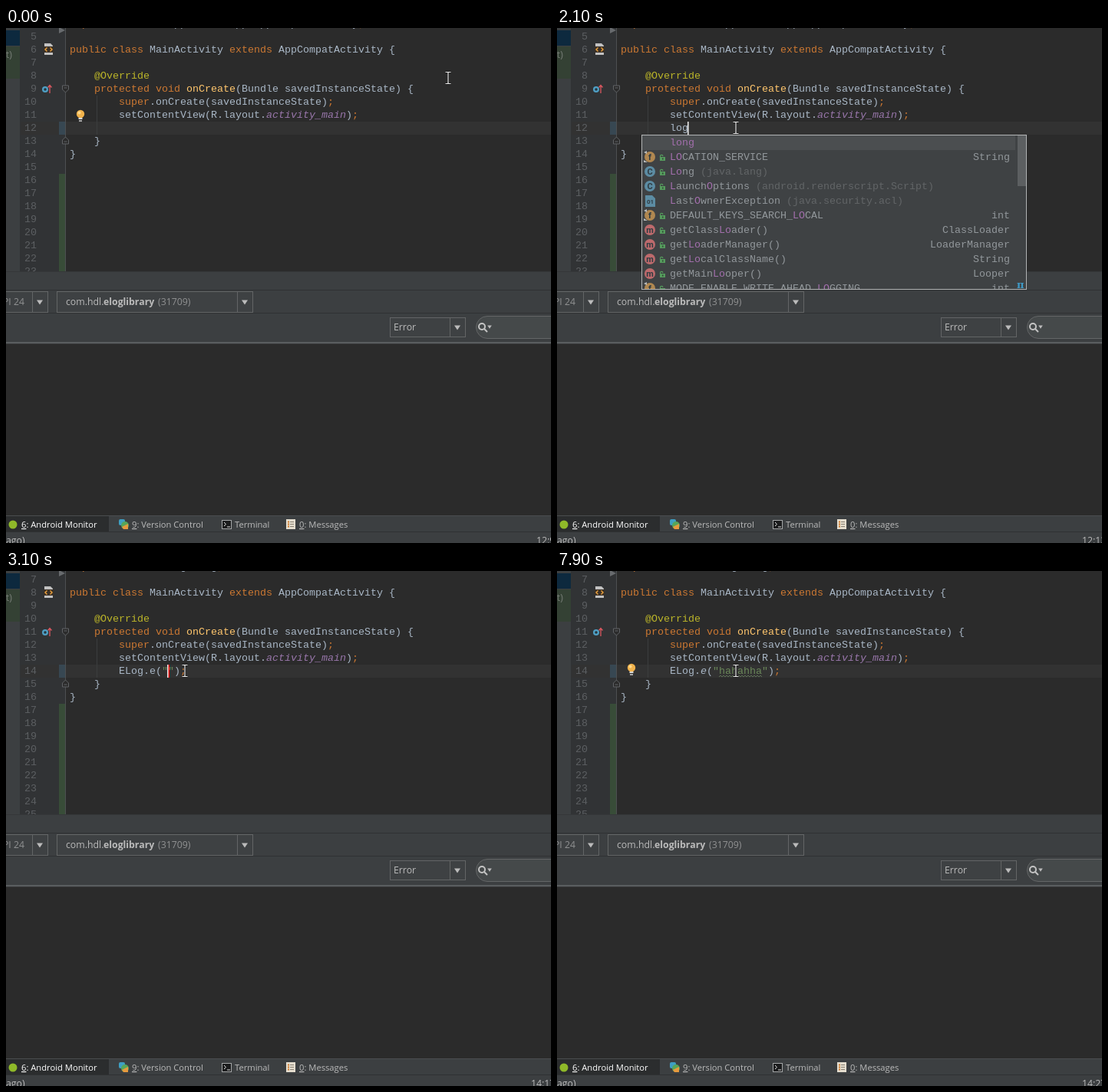
Write an HTML page that moves like this. It is 710 by 671 pixels and loops after 8 s.

```html
<!DOCTYPE html>
<html lang="en">
<head>
<meta charset="utf-8">
<title>Live template demo</title>
<style>
html, body { margin: 0; width: 100%; height: 100%; overflow: hidden; background: #2b2b2b; }
svg { display: block; }
text { white-space: pre; font: 12.3px "Open Sans", "Noto Sans", sans-serif; fill: #bbb; }
.code { font: 13.333px "Liberation Mono", "Courier New", monospace; fill: #a9b7c6; }
.tab { font-size: 11.2px; }
.num { fill: #5c5f62; }
.k { fill: #cc7832; }
.a { fill: #bbb529; }
.f { fill: #ffc66d; }
.i { fill: #9876aa; font-style: italic; }
.e { font-style: italic; }
.s { fill: #6a8759; }
.m { fill: #a36fad; }
.n { fill: #92979b; }
.g { fill: #626567; }
.x { fill: #626567; text-decoration: line-through; }
.b { font-weight: bold; }
.u { text-decoration: underline; }
</style>
</head>
<body>
<svg id="stage" width="710" height="671" viewBox="0 0 710 671"></svg>
<script>
const LOOP = 8000;

// Each step changes only the listed parts of the state.
const steps = [
  [0, { mouse: [576, 65], row: 122, bulb: 114, first: 5, green: 190, typed: '', caret: null, popup: null, pos: '12:9' }],
  [100, { mouse: [395, 120] }],
  [200, { mouse: [226, 171] }],
  [400, { row: 156, bulb: 0, caret: 91, pos: '14:2' }],
  [500, { mouse: [229, 148] }],
  [600, { mouse: [231, 139], row: 122, caret: 147, pos: '12:9' }],
  [800, { mouse: [233, 130], caret: null }],
  [1000, { caret: 147 }],
  [1100, { typed: 'l', caret: 155, pos: '12:10' }],
  [2000, { typed: 'lo', caret: 163, popup: 'lo', pos: '12:11' }],
  [2100, { typed: 'log', caret: 171, pos: '12:12' }],
  [2200, { popup: 'log' }],
  [2600, { typed: 'loge', caret: 179, popup: 'loge', pos: '12:13' }],
  [2700, { typed: 'log', caret: 171, popup: 'log', pos: '12:12' }],
  [3100, { call: 'ELog.e(', arg: '', box: true, caret: 211, popup: null, first: 7, green: 173, pos: '14:17' }],
  [3300, { call: 'ELog.~ee~d(' }],
  [3700, { caret: null }],
  [4400, { caret: 211 }],
  [4800, { caret: null }],
  [5300, { caret: 211 }],
  ...[[5800, 1], [6200, 2], [6300, 3], [6400, 4], [6500, 5], [6600, 7]].map(([t, n]) =>
    [t, { arg: 'hahahha'.slice(0, n), caret: 211 + 8 * n, pos: '14:' + (17 + n) }]),
  [6800, { box: false, caret: 291, pos: '14:27' }],
  [7200, { bulb: 128 }],
  [7900, { caret: null }],
];

// Row: icon, label, right-hand text. "~c" switches the text class to c.
const popups = {
  lo: [
    ['', '~mlong', ''],
    ['f', '~mLO~nCATION_SERVICE', 'String'],
    ['C', '~mLo~nng ~g(java.lang)', ''],
    ['C', '~mL~naunch~mO~nptions ~g(android.renderscript.Script)', ''],
    ['01', '~mL~nast~mO~nwnerException ~g(java.security.acl)', ''],
    ['f', '~nDEFAULT_KEYS_SEARCH_~mLO~nCAL', 'int'],
    ['m', '~ngetClass~mLo~nader()', 'ClassLoader'],
    ['m', '~nget~mLo~naderManager()', 'LoaderManager'],
    ['m', '~nget~mLo~ncalClassName()', 'String'],
    ['m', '~ngetMain~mLo~noper()', 'Looper'],
    ['f', '~nMODE_ENABLE_WRITE_AHEAD_~mLO~nGGING', 'int'],
  ],
  log: [
    ['', '~mlog', ''],
    ['C', '~mLog ~g(android.util)', ''],
    ['I', '~mLog ~x(org.apache.commons.logging)', ''],
    ['C', '~mLog~nWriter ~g(android.support.v4.util)', ''],
    ['C', '~mLog~ninFilter ~g(android.text)', ''],
    ['', '~mlog~ne', 'Log.e(TAG, String, Exception)'],
    ['C', '~mLog~no ~g(android.media.tv.TvContract.Channels)', ''],
    ['C', '~mLog~nPrinter ~g(android.util)', ''],
    ['C', '~mLog~nger ~g(java.util.logging)', ''],
    ['I', '~mLog~ngingMXBean ~g(java.util.logging)', ''],
    ['C', '~mLog~ngingPermission ~g(java.util.logging)', ''],
  ],
  loge: [
    ['', '~mloge', 'Log.e(TAG, String, Exception)'],
    ['z', '~mLog~nin~mE~nxception ~g(javax.security.auth.login)', ''],
  ],
};
const iconColor = { f: '#b08750', C: '#5c8ca3', m: '#bd6a6c', I: '#569a69', z: '#5a88a6' };

const rect = (x, y, w, h, fill, more = '') => `<rect x="${x}" y="${y}" width="${w}" height="${h}" fill="${fill}" ${more}/>`;
const path = (d, color, width = 1, fill = 'none') => `<path d="${d}" stroke="${color}" stroke-width="${width}" fill="${fill}"/>`;
const shape = (d, fill) => `<path d="${d}" fill="${fill}"/>`;
const circle = (x, y, r, fill) => `<circle cx="${x}" cy="${y}" r="${r}" fill="${fill}"/>`;

function text(x, y, str, cls = '', more = '') {
  const parts = str.split(/~(.)/);
  let out = parts[0];
  for (let i = 1; i < parts.length; i += 2) out += `<tspan class="${parts[i]}">${parts[i + 1]}</tspan>`;
  return `<text x="${x}" y="${y}" class="${cls}" ${more}>${out}</text>`;
}
const code = (x, top, str) => text(x, top + 12, str, 'code');
const arrow = (x, y, s = 4) => shape(`M${x - s} ${y - s / 2}h${2 * s}l${-s} ${s * 1.5}z`, '#bbb');

function sidePanel() {
  return rect(0, 0, 18, 317, '#3c3f41') + rect(0, 3, 18, 20, '#0d293e') +
    rect(0, 24, 18, 42, '#344134') + text(-6, 39, 'st)', '', 'fill-opacity=".5"');
}

function foldMark(y, up) {
  const s = up ? -1 : 1;
  return path(`M73.5 ${y - 4 * s}h8v${5 * s}l-4 ${4 * s}l-4 ${-4 * s}zM75.5 ${y - s}h4`, '#606366', 1, '#2b2b2b');
}

function gutter(s) {
  let out = rect(18, 0, 60, 317, '#313335') + rect(19, s.row, 691, 17, '#323232') +
    rect(69, 122, 8, 17, '#374752') + rect(69, s.green, 8, 317 - s.green, '#384c38') +
    path('M77.5 0V317', '#4d5052');
  for (let i = 0; i < 19; i++) out += text(40, 15 + 17 * i, String(s.first + i), 'code num', 'text-anchor="end"');
  out += shape('M69 -1l8 4l-8 4z', '#686b6e') + foldMark(79) + foldMark(147, true);
  out += shape('M50 20h8l3 3v12h-11z', '#c2c2c2') + rect(49, 24, 13, 8, '#3a3128') +
    path('M53.5 25.5l-2.5 2.5l2.5 2.5M57.5 25.5l2.5 2.5l-2.5 2.5', '#f0a33b', 1.4);
  return out + circle(51, 80, 4, '#4f9fc4') + circle(51, 80, 1.7, '#26333a') +
    path('M57 85V75M54.5 77.5l2.5-3l2.5 3', '#db5860', 1.3);
}

function source(s) {
  const imports = s.first === 5 ? 'android.support.v7.app.AppCompatActivity' : 'com.hdl.elog.ELog';
  let out = code(83, -14, `~kimport ~d${imports}~k;`) +
    path('M118.5 88V139', '#3b3d3e', 1) +
    code(83, 20, '~kpublic class ~dMainActivity ~kextends ~dAppCompatActivity {') +
    code(115, 54, '~a@Override') +
    code(115, 71, '~kprotected void ~fonCreate~d(Bundle savedInstanceState) {') +
    code(147, 88, '~ksuper~d.onCreate(savedInstanceState)~k;') +
    code(147, 105, 'setContentView(R.layout.~iactivity_main~d)~k;') +
    code(115, 139, '}') + code(83, 156, '}');
  if (!s.call) return out + code(147, 122, s.typed);
  const width = 8 * s.arg.length;
  out += code(147, 122, `${s.call}~s"${s.arg}"~d)~k;`);
  if (s.box) return out + rect(211.5, 122.5, Math.max(width, 1), 16, 'none', 'stroke="#f00"');
  return out + path('M211 138' + 'l2 -2l2 2'.repeat(width / 4), '#5f7257', 1);
}

function bulb(y) {
  return circle(97, y - 2, 5.2, '#f2b34c') + circle(95.5, y - 3.5, 2, '#ffd98c') +
    rect(94.5, y + 3, 5, 2, '#d9d9d9') + rect(95, y + 6, 4, 2, '#a8a8a8');
}

function itemIcon(kind, y) {
  if (!kind) return '';
  const label = (x, str, size) => `<text x="${x}" y="${y + 3.7}" text-anchor="middle" style="font:bold ${size}px Roboto,sans-serif;fill:#2f3b42">${str}</text>`;
  const lock = path(`M134.5 ${y + 1}v-2a1.7 1.7 0 0 1 3.4 0`, '#559b5d', 1.2) +
    rect(134, y, 7, 5, '#559b5d') + rect(137, y + 1.5, 1.5, 2, '#2f4533');
  if (kind === '01') return shape(`M115 ${y - 7}h9l4 4v11h-13z`, '#5c8ca3') + label(121.5, '01', 8);
  const mark = kind === 'z' ? shape(`M122 ${y - 5}l-5 6h3l-1 5l6-7h-3.5z`, '#26343d') : label(121, kind, 11);
  const badge = kind === 'f' ? shape(`M113 ${y - 6}l4-2v4zM113 ${y + 4}l5 3h-5z`, '#b9bbbc') : '';
  return circle(121, y, 7, iconColor[kind]) + mark + badge + lock;
}

function popup(name) {
  const items = popups[name], long = items.length > 2;
  const h = long ? 201 : 39, right = long ? 590 : 603;
  let out = `<clipPath id="list"><rect x="111" y="140" width="500" height="${h - 1}"/></clipPath>` +
    rect(110.5, 139.5, 501, h, '#3f4244', 'stroke="#b2b4b5"') +
    rect(111, 140, long ? 486 : 500, 19, '#4b4e50') + '<g clip-path="url(#list)">';
  items.forEach(([kind, label, type], i) => {
    const y = 149 + 19 * i;
    out += itemIcon(kind, y) + text(147, y + 4, label, 'code') +
      text(right, y + 4, '~n' + type, 'code', 'text-anchor="end"');
  });
  if (long) out += rect(600, 140, 11, 66, '#5c5f61') +
    '<text x="599" y="339" style="font:bold 13px \'DejaVu Serif\',serif;fill:#3f9bc8">π</text>';
  return out + '</g>';
}

function combo(x, y, w, h, split) {
  return rect(x + .5, y + .5, w, h, '#3e4143', 'stroke="#636566"') +
    path(`M${split + .5} ${y}v${h}`, '#636566') + arrow(split + 10, y + h / 2);
}

function panels() {
  return rect(0, 317, 710, 95, '#3c3f41') + path('M0 317.5H710', '#353739') +
    path('M0 341.5H710M0 371.5H710', '#2f3133') +
    combo(-20, 343, 74, 27, 34) + text(24, 361, 'API 24', '', 'text-anchor="end" fill-opacity=".65"') +
    combo(66, 343, 255, 27, 301) + text(78, 361, 'com.hdl.') + text(127, 361, 'eloglibrary', 'b') +
    text(198, 361, '(31709)', '', 'fill-opacity=".65"') +
    combo(500, 377, 98, 25, 578) + text(505, 394, 'Error') +
    rect(612.5, 375.5, 120, 29, '#45494a', 'rx="14.5" stroke="#646667"') +
    '<circle cx="620" cy="389" r="4" fill="none" stroke="#c4c4c4" stroke-width="2"/>' +
    path('M623 392l4 4', '#c4c4c4', 2) + arrow(630, 389, 2.8) +
    rect(0, 409, 710, 2.5, '#5a5d5f') + rect(0, 411.5, 710, 224, '#2b2b2b');
}

function tabs(pos) {
  const white = 'style="fill:#fff"';
  return rect(0, 635, 710, 36, '#3c3f41') + rect(0, 635, 134, 22, '#2b2d2e') +
    path('M0 635.5H710', '#4a4d4f') + path('M0 656.5H710', '#2f3133') +
    circle(9, 647, 5.5, '#8fb929') + text(20, 651, '~u6~d: Android Monitor', 'tab', white) +
    rect(147, 640, 8, 8, '#3e9fc2', 'rx="2"') + circle(155, 648, 5, '#57a65a') + shape('M151 650l8-4v7h-6z', '#e69a3e') +
    text(164, 651, '~u9~d: Version Control', 'tab') +
    rect(281.5, 641.5, 12, 11, '#1b1c1d', 'stroke="#a5a7a8"') + path('M284 644l2.5 2.5l-2.5 2.5M288 650h4', '#e0e0e0') +
    text(298, 651, 'Terminal', 'tab') +
    rect(365, 640, 12, 13, '#e4ddce') + path('M367 643.5h2M367 646.5h2M367 649.5h2', '#d07c2e', 2) +
    path('M370 643.5h5M370 646.5h5M370 649.5h5', '#8a8172') +
    text(382, 651, '~u0~d: Messages', 'tab') +
    text(0, 672, 'ago)') + text(pos.length > 4 ? 684 : 691, 672, pos);
}

function pointer([x, y]) {
  const d = `M${x - 3.5} ${y - 7.5}h3l.5 1l.5-1h3M${x} ${y - 7}v14M${x - 3.5} ${y + 7.5}h3l.5-1l.5 1h3`;
  return path(d, '#1a1a1a', 2.4) + path(d, '#e8e8e8', 1.2);
}

function draw(s) {
  return rect(0, 0, 710, 671, '#2b2b2b') + gutter(s) + sidePanel() + source(s) +
    (s.bulb ? bulb(s.bulb) : '') + panels() + tabs(s.pos) +
    (s.caret ? rect(s.caret - 1, s.row, 1.6, 17, '#e6e6e6') : '') +
    (s.popup ? popup(s.popup) : '') + pointer(s.mouse);
}

const stage = document.getElementById('stage');
let state = {};
const scenes = steps.map(([t, change]) => [t, draw(state = { ...state, ...change })]);
let shown = null;

function tick() {
  const t = performance.now() % LOOP;
  const scene = scenes.findLast(([start]) => start <= t);
  if (scene !== shown) {
    shown = scene;
    stage.innerHTML = scene[1];
  }
  requestAnimationFrame(tick);
}
tick();
</script>
</body>
</html>
```
